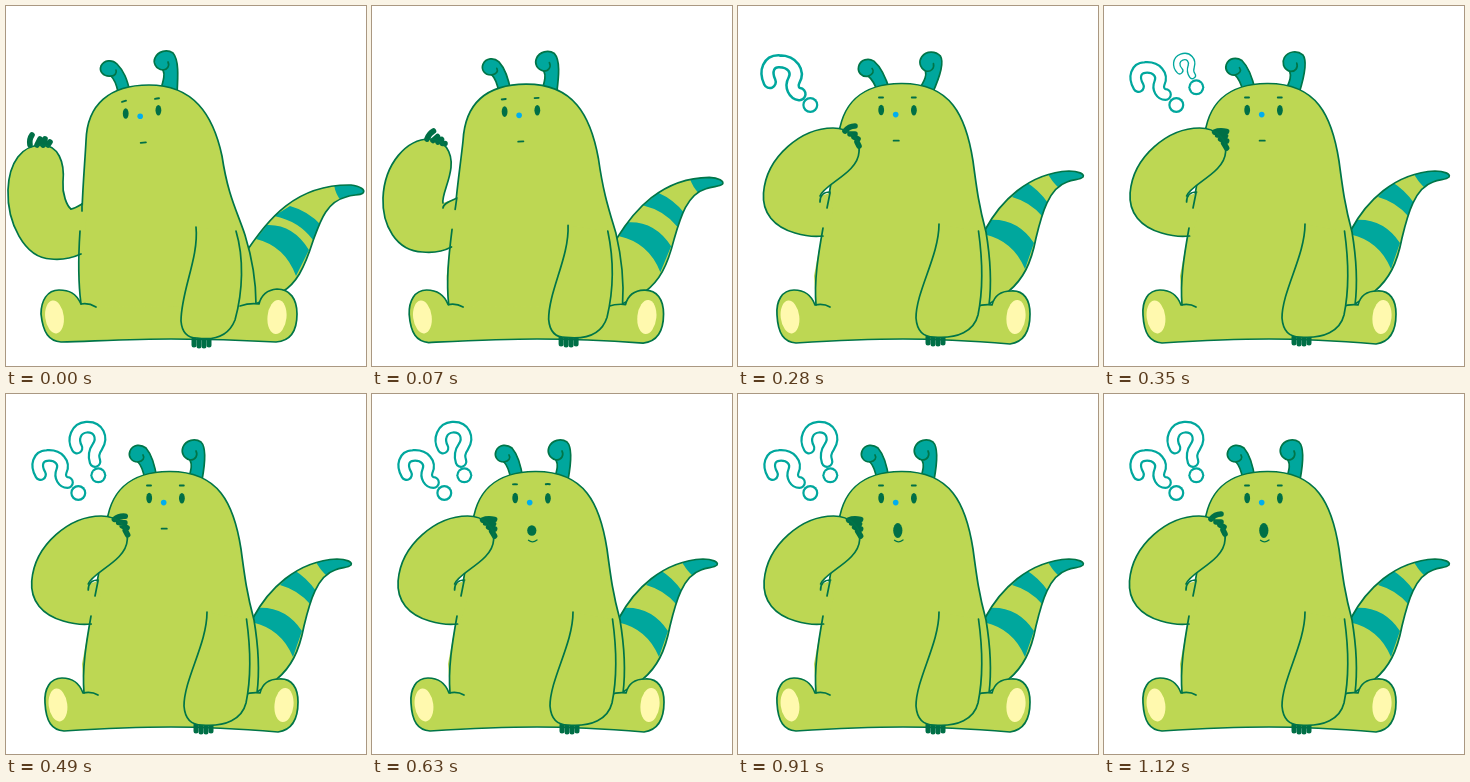
These frames come from a looping animation (360x360 px, 1.19 s). An HTML page with a canvas:

```html
<!DOCTYPE html>
<html lang="en">
<head>
<meta charset="utf-8">
<title>Pondering creature</title>
<style>
html, body { margin: 0; width: 100%; height: 100%; overflow: hidden; background: #fff; }
canvas { display: block; width: 360px; height: 360px; }
</style>
</head>
<body>
<canvas id="stage" width="360" height="360"></canvas>
<script>
const canvas = document.getElementById('stage');
const ctx = canvas.getContext('2d');
const dpr = window.devicePixelRatio || 1;
canvas.width = canvas.height = 360 * dpr;

const GREEN = '#bdd753', LINE = '#007548', DARK = '#006f46';
const TEAL = '#00a79d', CREAM = '#fff9ae', BLUE = '#00aeef';
const STEP = 70, STEPS = 17;

const lerp = (a, b, t) => a + (b - a) * t;
const clamp = v => Math.max(0, Math.min(1, v));

// Blend two path strings that share the same commands.
function mix(a, b, t) {
  const end = b.match(/-?[\d.]+/g);
  let i = 0;
  return a.replace(/-?[\d.]+/g, n => lerp(+n, +end[i++], t).toFixed(2));
}

function fill(d, color) {
  ctx.fillStyle = color;
  ctx.fill(new Path2D(d));
}

function stroke(d, color = LINE, width = 1.7) {
  ctx.strokeStyle = color;
  ctx.lineWidth = width;
  ctx.stroke(new Path2D(d));
}

function oval(x, y, rx, ry, color, tilt = 0) {
  ctx.beginPath();
  ctx.ellipse(x, y, rx, ry, tilt, 0, Math.PI * 2);
  ctx.fillStyle = color;
  ctx.fill();
}

function pivot(x, y, angle, size, draw) {
  ctx.save();
  ctx.translate(x, y);
  ctx.rotate(angle);
  ctx.scale(size, size);
  ctx.translate(-x, -y);
  draw();
  ctx.restore();
}

// Each entry: leaning pose, upright pose.
const body = [
  'M76 205C77 175 79 155 80 135C81 98 104 79 143 79C187 79 207 108 216 150C222 190 231 205 239 229C247 255 250 275 250 298',
  'M89 202C93 175 97 155 100 135C103 95 125 78 163 77.5C213 77 228 110 235 155C239 185 241 200 248 226C252 250 254 275 251 299'
];
const flank = [
  'M74 225C72 255 72 275 75 298',
  'M85 222C80 250 76 275 78 299'
];
const feet = [
  'M90 301C85 298 80 297 75 298C70 287 63 284 53 284C41 284 35 295 35 308C37 327 43 335 55 336C90 335 130 333 165 333C200 333 235 334 270 336C285 335 291 325 291 308C291 293 284 283 271 283C260 284 255 290 253 298C246 297 240 298 234 300',
  'M92 301C87 298 82 298 77 299C73 288 66 284 56 284C44 284 38 295 39 309C40 328 46 336 58 337C90 335 130 333 165 333C200 333 235 335 272 338C286 336 292 325 292 308C292 294 286 284 273 285C261 285 256 291 254 299C247 298 243 299 237 301'
];
const restArm = [
  'M190 221C193 252 175 285 175 315C176 327 182 332 191 332C211 335 223 329 229 314C237 285 238 252 230 225',
  'M201 218C201 250 178 285 178 312C179 325 186 331 196 331C220 333 236 325 240 309C246 280 244 250 240.5 225'
];
const tail = [
  'M242 243C262 215 288 178 345 179C354 180 360 184 357 187C353 190 347 188 340 191C320 196 314 216 307 235C298 263 290 278 276 286L245 300Z',
  'M247 224C262 196 290 167 331 165C340 165 347 168 345 171C342 174 336 173 329 176C311 182 304 207 298 232C293 258 285 273 271 285L248 300Z'
];
const bands = [
  ['M328 178Q329 188 336 196L365 196L365 176Z', 'M309 166Q313 175 322 183L352 180L350 160Z'],
  ['M268 210L284 200Q302 205 315 219L307 234Q293 215 268 210Z', 'M274 191L288 176Q301 184 310 197L304 210Q292 196 274 191Z'],
  ['M250 233L261 219Q287 218 303 244L290 270Q279 240 250 233Z', 'M245 228L251 214Q279 212 296 237L287 263Q275 234 245 228Z']
];
const feelers = [
  {
    d: ['M112 86C110 76 107 72 105 70C97 71 93 65 95 60C98 54 106 53 111 58C118 65 121 73 124 86',
        'M139 86C137 75 134 70 132 68C125 68 122 62 124 57C127 50 135 50 140 54C146 61 149 70 151 86'],
    curl: ['M105 70C109 70 111 67 110 64', 'M132 68C137 67 139 64 137 61'],
    x: 145, tilt: -0.16
  },
  {
    d: ['M154 86C158 73 159 68 157 64C149 63 147 56 149 52C152 45 161 43 167 47C173 54 172 70 171 88',
        'M182 86C186 74 186 70 184 66C177 64 175 58 177 53C180 46 189 44 195 48C201 54 199 70 196 86'],
    curl: ['M157 64C161 64 164 60 162 56', 'M184 66C190 66 192 61 190 57'],
    x: 190, tilt: 0.24
  }
];

// Raised arm: low, halfway, at the chin.
const arm = [
  'M75 248C66 252 54 254 45 253C18 252 1 216 2 184C3 156 16 139 36 139C52 139 59 156 57 176C56 188 61 200 65 203',
  'M84 234C76 239 67 240 56 239C30 238 19 222 20 200C22 158 54 127 79 127C93 127 102 136 101 147C99 164 78 180 77 191',
  'M85 230C77 231 67 230 57 227C36 221 24 207 25.5 187C28.5 150 64 122 95 122C112 122 123 134 121 146C120 167 86 178 82 190'
];
const crease = [
  'M65 203C67 203 71 201 76 198',
  'M77 201C75 194 80 191 92 187',
  'M82 196C82 189 85 186 92 186'
];
const fingers = [
  'M24 139Q23 133 26 129M31 139L34 133M37 139L39 133M42 139L44 136',
  'M86 127Q91 122 97 121M91 130L97 128M95 133L100 134M99 136L102 139',
  'M107 125Q111 120 117 120M112 128L117 128M116 131L120 133M119 136L121 140'
];
const fingersDown = 'M110 126Q115 124 122 125.5M113 129L121 130M116 133L122 135M119 137L122 142';

function drawTail(p) {
  const d = mix(...tail, p);
  fill(d, GREEN);
  ctx.save();
  ctx.clip(new Path2D(d));
  for (const b of bands) fill(mix(...b, p), TEAL);
  ctx.restore();
  stroke(d);
}

function drawFeelers(p, sway) {
  for (const f of feelers) {
    pivot(f.x, 80, f.tilt * sway, 1, () => {
      const d = mix(...f.d, p);
      fill(d, TEAL);
      stroke(d);
      stroke(mix(...f.curl, p));
    });
  }
}

function drawBody(p) {
  const d = mix(...body, p);
  const low = lerp(75, 78, p);
  const side = lerp(74, 85, p);
  fill(d + `L262 330L66 330L${low} 298L${low - 2} 270L${side} 222Z`, GREEN);
  stroke(d);
  const f = mix(...feet, p);
  fill(f, GREEN);
  stroke(f);
  oval(lerp(48.5, 52, p), 311, 9.3, 16.5, CREAM, -0.12);
  oval(lerp(271, 278, p), 311, 9.5, 17, CREAM, 0.1);
}

function drawRestArm(p) {
  const x = lerp(188, 190, p), y = lerp(334, 332, p);
  for (let i = 0; i < 4; i++) {
    const drop = i % 3 ? 6 : 5;
    stroke(`M${x + i * 5} ${y - 1}L${x + i * 5} ${y + drop}`, DARK, 5);
  }
  const d = mix(...restArm, p);
  fill(d, GREEN);
  stroke(d);
}

function drawFace(p, open, raise) {
  const x = lerp(0, 23.5, p);
  oval(119.7 + x, lerp(107.5, 104, p), 2.9, 5.3, DARK);
  oval(152.4 + x, 104.3, 2.9, 5.3, DARK);
  oval(134.2 + x, lerp(110.3, 108.6, p), 2.8, 2.8, BLUE);
  const left = lerp(95.3, 91.5, p) - raise * 2.2;
  const right = lerp(92.3, 91.5, p) - raise * 2.5;
  const slant = lerp(0.6, 0, p);
  const lx = lerp(118, 143, p), rx = lerp(151, 175.8, p);
  const bend = raise * 0.8;
  stroke(`M${lx - 2} ${left + slant}Q${lx} ${left - bend} ${lx + 2} ${left - slant}`, DARK, 1.9);
  stroke(`M${rx - 2} ${right + slant}Q${rx} ${right - bend} ${rx + 2} ${right}`, DARK, 1.9);
  const mx = lerp(137.3, 158.2, p), my = lerp(136.6, 134.7, p);
  if (open) {
    oval(159.8, 136.5, 4.6, 7.5 * open, DARK);
    stroke('M156.5 146.3Q160.5 149.5 165 146', LINE, 1.3);
  } else {
    stroke(`M${mx - 2.6} ${my + slant / 2}L${mx + 2.6} ${my - slant / 2}`, DARK, 1.8);
  }
}

function drawArm(p, reach, tap) {
  const i = Math.min(1, Math.floor(reach)), t = reach - i;
  const pose = set => mix(set[i], set[i + 1], t);
  const d = pose(arm);
  const joint = mix('L76 198L81 205L79 225Z', 'L92 187L95 205L89 224Z', p);
  ctx.save();
  ctx.translate(tap * 0.6, 0);
  fill(d + joint, GREEN);
  stroke(mix(pose(fingers), fingersDown, tap), DARK, 5.6);
  stroke(d);
  stroke(pose(crease));
  ctx.restore();
  stroke(mix(...flank, p));
  stroke(mix('M76 198L76 205', 'M92 187L89 202', p));
}

// The hook grows and swings about its lower tip, above a fixed dot.
function drawMark(hook, tipX, tipY, x, y, size) {
  if (!size) return;
  pivot(tipX, tipY, (size - 1) * 0.7, size, () => {
    stroke(hook, TEAL, 12.8);
    stroke(hook, '#fff', 8.4);
  });
  oval(x, y, 8, 8, TEAL);
  oval(x, y, 5.8, 5.8, '#fff');
}

const pop = n => n < 0 ? 0 : [0.6, 1.14, 1][Math.min(n, 2)];

function draw(ms) {
  const n = Math.floor(ms / STEP) % STEPS;
  const p = clamp(n * 0.55);
  const reach = Math.min(2, n / 2);
  const sway = Math.max(0, 1 - Math.abs(n - 4) * 0.5);
  const tap = n < 4 ? 0 : [0, 1, 0.85, 0.4][n % 4];
  const open = n < 9 ? 0 : n === 9 ? 0.7 : 1;
  const raise = clamp(2 - Math.abs(n - 10.5));

  ctx.setTransform(dpr, 0, 0, dpr, 0, 0);
  ctx.fillStyle = '#fff';
  ctx.fillRect(0, 0, 360, 360);
  ctx.lineCap = ctx.lineJoin = 'round';

  drawTail(p);
  drawFeelers(p, sway);
  drawBody(p);
  drawRestArm(p);
  drawFace(p, open, raise);
  drawArm(p, reach, tap);
  drawMark('M34.5 80.5C29 71 32 62 41 61.5C53 60.5 59 69 55.5 77C53 83 57 88.5 61.5 88.5', 63, 90, 72.3, 99, pop(n - 3));
  drawMark('M71 54C66 45 70 34 80.5 33.2C93 32.5 97 44 91.5 52.5C87 59 87.5 63 89 67.5', 89, 72, 92.3, 81.3, pop(n - 5));
}

const start = performance.now();
function loop() {
  draw(performance.now() - start);
  requestAnimationFrame(loop);
}
loop();
</script>
</body>
</html>
```
